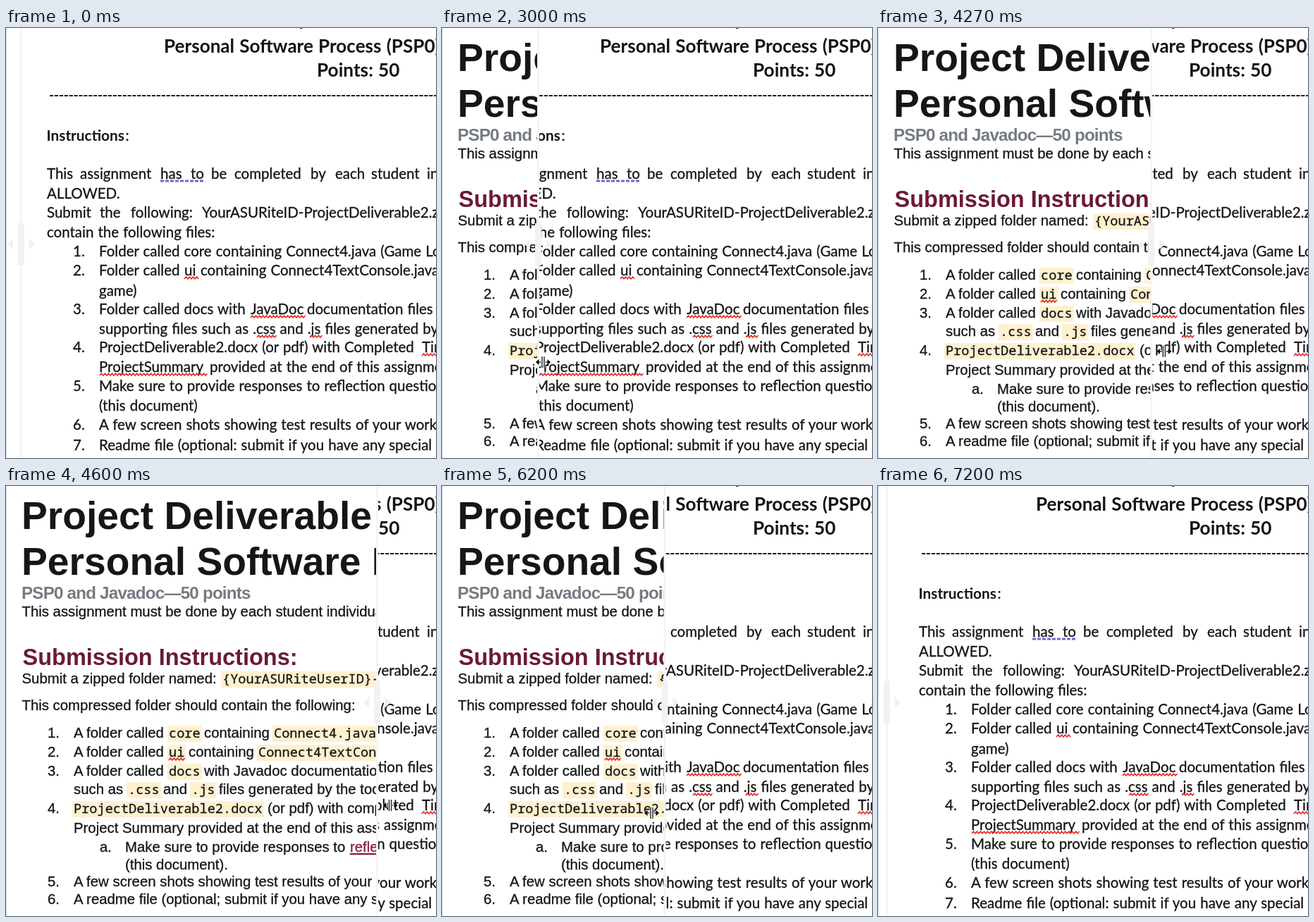
These frames come from a looping animation (610x610 px, 9.34 s). An HTML page:

```html
<!DOCTYPE html>
<html lang="en">
<head>
<meta charset="utf-8">
<title>Page comparison slider</title>
<style>
  html, body { margin: 0; width: 100%; height: 100%; overflow: hidden; background: #fff; }
  svg { display: block; width: 100vw; height: 100vh; }
  .sans { font: 20.37px "Liberation Sans", Arial, sans-serif; fill: #161616; }
  .mono { font: 18.6px "Noto Sans Mono", monospace; }
  .lato { font: 20.5px Lato, sans-serif; word-spacing: .8px; fill: #141414; }
  .sans text, .lato text { stroke: #161616; stroke-width: .3px; }
  .sans .bold, .lato .bold { font-weight: 700; stroke: none; }
</style>
</head>
<body>
<svg id="stage" viewBox="0 0 610 610">
  <defs><clipPath id="cut"><rect id="cutBox" width="620" height="610"/></clipPath></defs>
  <rect width="610" height="610" fill="#fff"/>
  <g id="after" class="sans"></g>
  <g clip-path="url(#cut)">
    <rect width="610" height="610" fill="#fff"/>
    <g id="before" class="lato"></g>
  </g>
  <rect width="1" height="610" fill="#cbe5f3"/>
  <g id="slider">
    <rect x="-1.5" width="3" height="610" fill="#f4f5f5"/>
    <rect x="-4.5" y="277" width="9" height="60" fill="#f2f2f2"/>
    <path d="M-11.5 300v14l-8-7zM11.5 300v14l8-7z" fill="#f0f0f0"/>
  </g>
  <g id="cursor">
    <path d="M-1.5-8V8M1.5-8V8M-10 0h7M3 0h7" stroke="#fff" stroke-width="3"/>
    <path d="M-1.5-8V8M1.5-8V8M-9 0h6M3 0h6" stroke="#000" stroke-width="1.2"/>
    <path d="M-10.5 0l4.5-4v8zM10.5 0l-4.5-4v8z"/>
  </g>
</svg>
<script>
const $ = id => document.getElementById(id);
const after = $('after'), before = $('before');

function add(parent, tag, attrs, content = '') {
  const el = document.createElementNS('http://www.w3.org/2000/svg', tag);
  for (const name in attrs) el.setAttribute(name, attrs[name]);
  el.textContent = content;
  parent.append(el);
  return el;
}

// Places runs on one baseline: x, text, x, text, ...
function line(parent, y, ...runs) {
  for (let i = 0; i < runs.length; i += 2)
    add(parent, 'text', { x: runs[i], y }, runs[i + 1]);
}

function heading(parent, x, y, size, text, attrs = {}) {
  add(parent, 'text', { x, y, class: 'bold', style: `font-size:${size}px`, ...attrs }, text);
}

function code(x, y, text) {
  add(after, 'rect', { x: x - 2, y: y - 17, width: text.length * 11.16 + 4, height: 23, fill: '#fff0cf' });
  add(after, 'text', { x, y, class: 'mono' }, text);
}

function squiggle(parent, x, y, width) {
  let d = `M${x} ${y + 5}`;
  for (let i = 0; i < width / 2.5; i++) d += `l2.5 ${i % 2 ? 3 : -3}`;
  add(parent, 'path', { d, fill: 'none', stroke: '#e2332f', 'stroke-width': 1.7 });
}

function buildAfter() {
  heading(after, 22, 61, 55.2, 'Project Deliverable 2:');
  heading(after, 22, 126, 55.2, 'Personal Software Process');
  heading(after, 22, 160, 24.2, 'PSP0 and Javadoc—50 points', { fill: '#747b82', 'letter-spacing': -.8 });
  line(after, 185, 22.5, 'This assignment must be done by each student individually. Group');
  heading(after, 23.5, 254, 32.5, 'Submission Instructions:', { fill: '#6b1a36' });
  line(after, 280, 22.5, 'Submit a zipped folder named:');
  code(307, 280, '{YourASURiteUserID}-ProjectDeliverable2.zip');
  line(after, 318, 22.5, 'This compressed folder should contain the following:');

  line(after, 357, 59, '1.', 96, 'A folder called', 281, 'containing');
  code(231, 357, 'core');
  code(380, 357, 'Connect4.java');
  line(after, 384, 59, '2.', 96, 'A folder called', 259, 'containing');
  code(231, 384, 'ui');
  squiggle(after, 231, 384, 22);
  code(358, 384, 'Connect4TextConsole.java');
  line(after, 411, 59, '3.', 96, 'A folder called', 281, 'with Javadoc documentation files and');
  code(231, 411, 'docs');
  line(after, 437, 96, 'such as', 223, 'and', 302, 'files generated by the tool.');
  code(173, 437, '.css');
  code(263, 437, '.js');
  line(after, 464, 59, '4.', 371, '(or pdf) with completed Time Log');
  code(96, 464, 'ProjectDeliverable2.docx');
  line(after, 492, 96, 'Project Summary provided at the end of this assignment.');
  line(after, 519, 133, 'a.', 169, 'Make sure to provide responses to');
  add(after, 'text', { x: 488, y: 519, style: 'fill:#8c1d40;stroke:#8c1d40', 'text-decoration': 'underline' }, 'reflection questions');
  line(after, 544, 169, '(this document).');
  line(after, 568, 59, '5.', 96, 'A few screen shots showing test results of your work');
  line(after, 593, 59, '6.', 96, 'A readme file (optional; submit if you have any special');
}

function buildBefore() {
  heading(before, 414, -3, 26.2, 'y');
  heading(before, 224, 34.5, 26.1, 'Personal Software Process (PSP0)');
  heading(before, 441, 69, 26.2, 'Points: 50');
  add(before, 'path', { d: 'M62 96H620', stroke: '#1a1a1a', 'stroke-width': 2, 'stroke-dasharray': '5.2 1.7' });
  heading(before, 57.5, 160, 20.8, 'Instructions');
  line(before, 160, 169.5, ':');

  line(before, 214, 58, 'This', 105, 'assignment', 219, 'has', 262, 'to', 291, 'be',
    324, 'completed', 432, 'by', 467, 'each', 518, 'student', 597, 'in');
  add(before, 'path', { d: 'M219 217H281', stroke: '#7a62d3', 'stroke-width': 2.8, 'stroke-dasharray': '5 2' });
  line(before, 242, 58, 'ALLOWED.');
  line(before, 269, 58, 'Submit', 133, 'the', 177, 'following:', 278, 'YourASURiteID-ProjectDeliverable2.zip');
  line(before, 297, 58, 'contain the following files:');

  line(before, 324, 95, '1.', 132, 'Folder called core containing Connect4.java (Game Logic)');
  line(before, 351, 95, '2.', 132, 'Folder called', 253, 'ui', 276, 'containing Connect4TextConsole.java');
  squiggle(before, 253, 351, 19);
  line(before, 380, 132, 'game)');
  line(before, 406, 95, '3.', 132, 'Folder called docs with', 347, 'JavaDoc', 427, 'documentation files');
  squiggle(before, 347, 406, 76);
  line(before, 434, 132, 'supporting files such as .css and .js files generated by');
  squiggle(before, 356, 434, 27);
  squiggle(before, 431, 434, 17);
  line(before, 460, 95, '4.', 132, 'ProjectDeliverable2.docx (or pdf) with Completed', 590, 'Time');
  squiggle(before, 590, 460, 30);
  line(before, 488, 132, 'ProjectSummary', 289, 'provided at the end of this assignment');
  squiggle(before, 133, 488, 152);
  line(before, 515, 95, '5.', 132, 'Make sure to provide responses to reflection questions');
  line(before, 543, 132, '(this document)');
  line(before, 570, 95, '6.', 132, 'A few screen shots showing test results of your work');
  line(before, 599, 95, '7.', 132, 'Readme file (optional: submit if you have any special');
}

const LOOP = 9340, TICK = 200 / 3, AWAY = -40;

// Drags: each pose is tick, slider x, cursor x, cursor y. The last pose holds.
const drags = [
  [[0, 21.5, AWAY, 482]],
  [[23, 5, 10.5, 482], [30, 32, 43, 480], [36, 92, 108, 476]],
  [[45, 136.5, 143.5, 474], [55, 282.5, 289.5, 464], [58, 325, 344, 461]],
  [[63, 360, 378, 460], [69, 526.5, 545, 453], [73, 604, 609, 450]],
  [[83, 575, 556, 453], [93, 316, 297.5, 464], [96, 178, 154.5, 473], [99, 108, 90.5, 477]],
  [[104, 85, 70, 478], [107, 40, 31, 481]],
  [[108, 12.5, AWAY, 482]]
];

function poseAt(tick) {
  const drag = drags.filter(d => d[0][0] <= tick).pop();
  const next = drag.findIndex(p => p[0] > tick);
  if (next < 0) return drag[drag.length - 1];
  const a = drag[next - 1], b = drag[next];
  const f = (tick - a[0]) / (b[0] - a[0]);
  return a.map((v, i) => v + (b[i] - v) * f);
}

function render(ms) {
  const tick = Math.floor((ms % LOOP + 3.4) / TICK);
  const [, x, cx, cy] = poseAt(tick);
  $('cutBox').setAttribute('x', x);
  $('slider').setAttribute('transform', `translate(${x})`);
  $('cursor').setAttribute('transform', `translate(${cx} ${cy})`);
}

buildAfter();
buildBefore();
const start = performance.now();
function loop() {
  render(performance.now() - start);
  requestAnimationFrame(loop);
}
loop();
</script>
</body>
</html>
```
